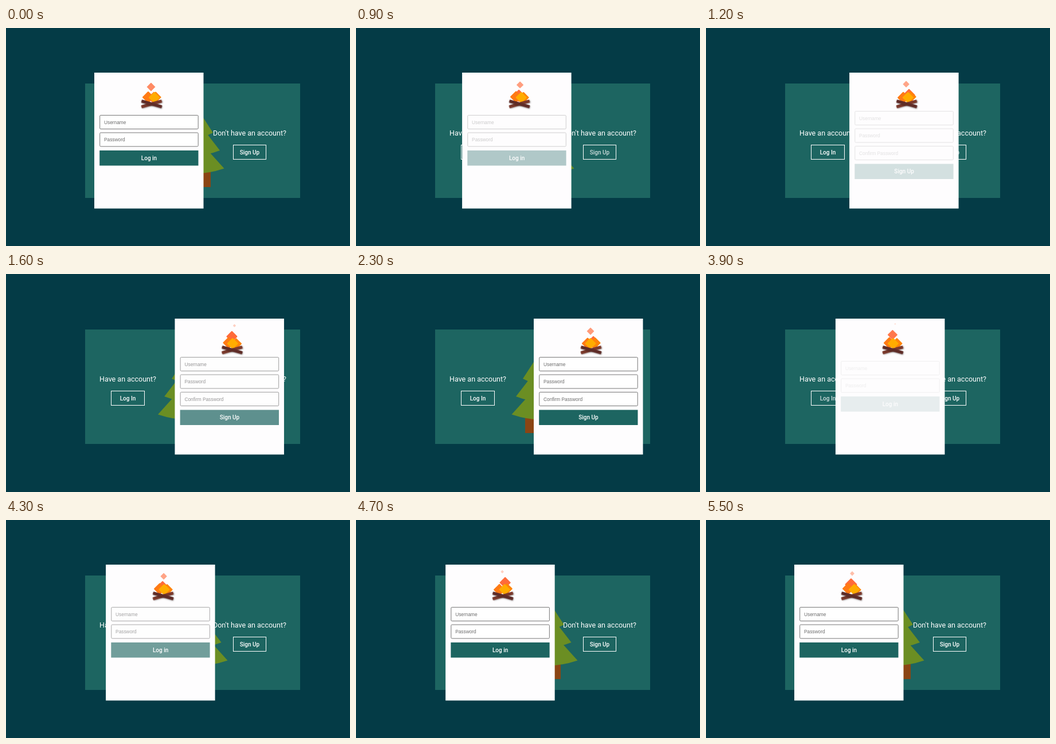
An HTML page for the animation above (5600 ms loop, 600x381 px).

```html
<!DOCTYPE html>
<html lang="en">
<head>
<meta charset="utf-8">
<title>Login and sign-up card</title>
<style>
  html, body { margin: 0; width: 100%; height: 100%; overflow: hidden; background: #043b46; }
  svg { display: block; }
  text { font-family: Roboto, sans-serif; fill: #fff; }
  .heading { font-size: 12.5px; }
  .label { font-size: 10px; font-weight: 500; text-anchor: middle; }
  .hint { font: 8.33px "Liberation Sans", Arial, sans-serif; fill: #6c6c6c; }
  .outline { fill: none; stroke: #fff; }
  .field { fill: #fff; stroke: #767676; }
  .teal { fill: #1d6561; }
  .leaf { fill: #6b8e23; }
  .log { filter: drop-shadow(1px 1px 1px #0005); }
</style>
</head>
<body>
<svg width="600" height="381" viewBox="0 0 600 381">
  <rect class="teal" x="138" y="97" width="375" height="200"/>
  <rect x="295" y="250" width="62" height="28" fill="#8b4513"/>
  <g id="tree"></g>

  <text class="heading" x="163" y="188">Have an account?</text>
  <rect class="outline" x="183.5" y="204.5" width="58" height="25"/>
  <text class="label" id="goLogin" x="212.5" y="220.5">Log In</text>
  <text class="heading" x="361" y="188">Don't have an account?</text>
  <rect class="outline" x="396.5" y="204.5" width="57" height="25"/>
  <text class="label" id="goSignup" x="425" y="220.5">Sign Up</text>

  <g id="card">
    <rect y="78" width="190.5" height="237.5" fill="#fefdfe"/>
    <g id="login"></g>
    <g id="signup"></g>
    <g transform="translate(100 0)">
      <g id="fire"></g>
      <rect class="log" x="-18.5" y="130" width="37" height="5.5" rx="1" fill="#7a392c" transform="rotate(-16 0 133)"/>
      <rect class="log" x="-18.5" y="130" width="37" height="5.5" rx="1" fill="#5f2c27" transform="rotate(16 0 133)"/>
    </g>
  </g>
</svg>
<script>
const LOOP = 5600, STEP = 100;
const TO_SIGNUP = 665, TO_LOGIN = 3430, SLIDE = 1500;
const LEFT = 154, TRAVEL = 156;
const $ = id => document.getElementById(id);
const clamp = v => Math.max(0, Math.min(1, v));

function add(parent, tag, attrs) {
  const el = document.createElementNS('http://www.w3.org/2000/svg', tag);
  for (const key in attrs) el.setAttribute(key, attrs[key]);
  return parent.appendChild(el);
}

// Tree layers, bottom first: apex y, tip y, half width, sway share
const layers = [[185, 245.5, 54.5, 7], [153, 214, 47, 3], [129, 183, 35, 2]].map(([apex, tip, half, sway]) => ({
  sway,
  el: add($('tree'), 'path', {
    class: 'leaf',
    d: `M326 ${apex}L${326 + half} ${tip}Q326 ${tip + 18.5} ${326 - half} ${tip}Z`
  })
}));

function buildForm(id, top, hints, action) {
  const form = $(id);
  hints.forEach((hint, i) => {
    const y = top + i * 30.5;
    add(form, 'rect', { class: 'field', x: 9.7, y, width: 171.5, height: 24, rx: 1.5 });
    add(form, 'text', { class: 'hint', x: 17, y: y + 15 }).textContent = hint;
  });
  const y = top + hints.length * 30.5 + 0.5;
  add(form, 'rect', { class: 'teal', x: 9.2, y, width: 172.3, height: 26.5 });
  add(form, 'text', { class: 'label', x: 95.5, y: y + 16.7 }).textContent = action;
}
buildForm('login', 152.5, ['Username', 'Password'], 'Log in');
buildForm('signup', 145.5, ['Username', 'Password', 'Confirm Password'], 'Sign Up');

function diamond(fill) {
  return add($('fire'), 'rect', { x: -0.5, y: -0.5, width: 1, height: 1, rx: 0.08, fill });
}
function place(el, x, y, diagonal) {
  el.setAttribute('transform', `translate(${x} ${y}) rotate(45) scale(${diagonal / Math.SQRT2})`);
}
const sparks = [0, 1].map(() => diamond('#ff6b3a'));
const embers = [diamond('#ff7a14'), diamond('#ff8408')];
const core = diamond('#ffac00');
const DRIFT = [4, -0.5, 1, -1];

// CSS "ease": cubic-bezier(.25, .1, .25, 1)
function ease(x) {
  const bezier = (s, a, b) => 3 * (1 - s) ** 2 * s * a + 3 * (1 - s) * s * s * b + s ** 3;
  let low = 0, high = 1;
  for (let i = 0; i < 24; i++) {
    const mid = (low + high) / 2;
    if (bezier(mid, 0.25, 0.25) < x) low = mid; else high = mid;
  }
  return bezier(low, 0.1, 1);
}

const slide = (t, start) => ease(clamp((t - start) / SLIDE));
const fadeOut = (t, start) => 1 - clamp((t - start) / 356);
const fadeIn = (t, start) => clamp((t - start - 394) / 762);
const swing = (t, start) => Math.sin(Math.PI * clamp((t - start - 500) / 1135));

function drawFire(t) {
  const beat = t * 0.003545, newest = Math.floor(beat);
  sparks.forEach((el, i) => {
    const n = newest - 1 + i, age = beat - n;
    const y = 122 - 19 * age;
    place(el, DRIFT[(n + 4) % 4], y, Math.max(0, Math.min(22, (y - 83) * 0.76)));
    el.setAttribute('opacity', clamp((2.1 - age) / 1.4));
  });
  const flicker = Math.sin(beat * Math.PI);
  place(embers[0], -6, 121 + flicker, 21);
  place(embers[1], 7, 121 - flicker, 20);
  place(core, 1.5 + 3 * Math.cos(2 * Math.PI * t / LOOP), 121.5, 20);
}

function draw(t) {
  const x = LEFT + TRAVEL * (slide(t, TO_SIGNUP) - slide(t, TO_LOGIN));
  $('card').setAttribute('transform', `translate(${x} 0)`);

  const back = t >= TO_LOGIN;
  $('login').setAttribute('opacity', back ? fadeIn(t, TO_LOGIN) : fadeOut(t, TO_SIGNUP));
  $('signup').setAttribute('opacity', back ? fadeOut(t, TO_LOGIN) : fadeIn(t, TO_SIGNUP));

  const pressed = (start) => t >= start && t < start + SLIDE ? 0.78 : 1;
  $('goSignup').setAttribute('opacity', pressed(TO_SIGNUP));
  $('goLogin').setAttribute('opacity', pressed(TO_LOGIN));

  const lean = swing(t, TO_LOGIN) - swing(t, TO_SIGNUP);
  for (const { el, sway } of layers) el.setAttribute('transform', `translate(${lean * sway} 0)`);

  drawFire(t);
}

const begin = performance.now();
function tick() {
  const t = (performance.now() - begin) % LOOP;
  draw(Math.floor(t / STEP) * STEP);
  requestAnimationFrame(tick);
}
tick();
</script>
</body>
</html>
```
